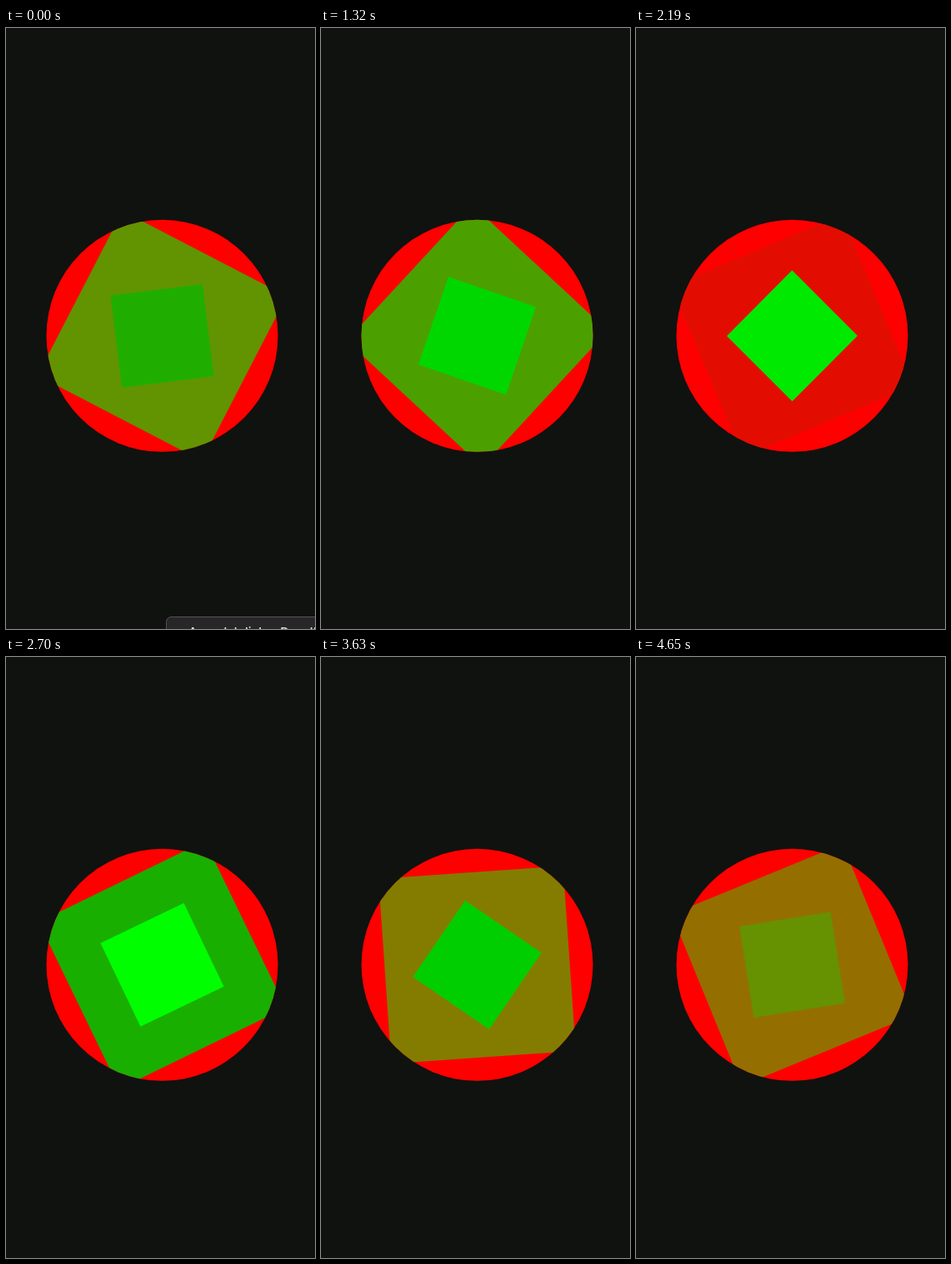
Write an HTML page that moves like this. It is 371x720 px and loops after 5130 ms.

```html
<!DOCTYPE html>
<html lang="en">
<head>
<meta charset="utf-8">
<title>Spinning squares</title>
<style>
  html, body { margin: 0; width: 100%; height: 100%; overflow: hidden; background: #10120f; }
  svg { display: block; width: 371px; height: 720px; }
  text { font: 500 15px Inter, sans-serif; fill: #e6e6e6; }
</style>
</head>
<body>
<svg viewBox="0 0 371 720">
  <clipPath id="disc"><circle r="139"/></clipPath>
  <g transform="translate(187.5 368.8)">
    <circle r="139" fill="#f00"/>
    <g clip-path="url(#disc)">
      <rect id="outer" x="-111" y="-111" width="222" height="222"/>
      <rect id="inner" x="-55.5" y="-55.5" width="111" height="111"/>
    </g>
  </g>
  <g id="tip">
    <rect x="192.5" y="705.5" width="200" height="40" rx="6" fill="#29262a" stroke="#565356"/>
    <text x="219" y="729">A modal dialog Result</text>
  </g>
</svg>
<script>
const LOOP = 5130, STEP = 30, HOLD = 480;

// Time in ms and number of outer-square passes completed by then.
const PROGRESS = [
  [450, 0.576], [960, 1.041], [1320, 1.381], [2190, 2.187],
  [2700, 2.678], [3630, 3.511], [4650, 4.438]
];
const INNER_RATE = 0.4;

const outer = document.getElementById('outer');
const inner = document.getElementById('inner');
const tip = document.getElementById('tip');

function passesAt(ms) {
  const first = PROGRESS[0], last = PROGRESS[PROGRESS.length - 1];
  if (ms <= first[0]) return first[1];
  if (ms >= last[0]) return last[1];
  const i = PROGRESS.findIndex(([t]) => t > ms);
  const [t0, p0] = PROGRESS[i - 1], [t1, p1] = PROGRESS[i];
  return p0 + (p1 - p0) * (ms - t0) / (t1 - t0);
}

// Alternating 0 → 1 → 0.
const pingPong = x => 1 - Math.abs(1 - x % 2);

const toLinear = c => c <= 0.04045 ? c / 12.92 : ((c + 0.055) / 1.055) ** 2.4;
const toByte = c => {
  const v = Math.min(1, Math.max(0, c));
  return Math.round(255 * (v <= 0.0031308 ? 12.92 * v : 1.055 * v ** (1 / 2.4) - 0.055));
};

// Display P3 red and green channels, clipped to sRGB.
function p3(red, green) {
  const r = toLinear(red), g = toLinear(green);
  return `rgb(${toByte(1.2249 * r - 0.2247 * g)},${toByte(1.0421 * g - 0.0421 * r)},0)`;
}

function pose(square, turn, red) {
  square.setAttribute('transform', `rotate(${360 * turn})`);
  square.setAttribute('fill', p3(red, 1 - red));
}

function draw() {
  const ms = Math.floor(performance.now() % LOOP / STEP) * STEP;
  const passes = passesAt(ms);
  const u = pingPong(passes), v = pingPong(passes * INNER_RATE);
  // Each square is lime, as opaque as it is turned, over what lies below.
  pose(outer, u, 1 - u);
  pose(inner, v, (1 - u) * (1 - v));
  tip.style.display = ms < HOLD ? '' : 'none';
  requestAnimationFrame(draw);
}
draw();
</script>
</body>
</html>
```
